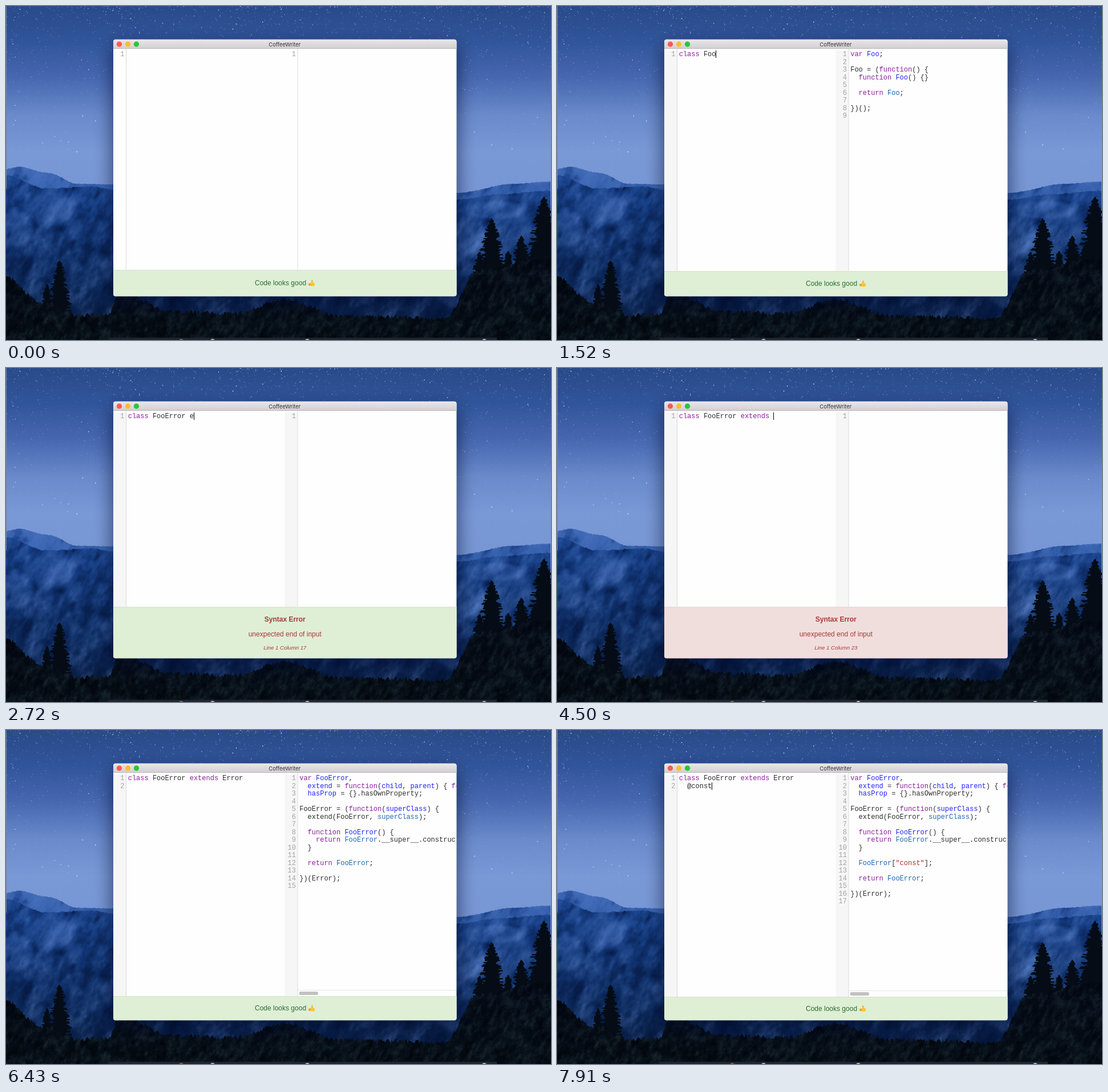
An HTML page with a canvas that plays this animation: 955x586 px, repeating every 8 s.

```html
<!DOCTYPE html>
<html lang="en">
<head>
<meta charset="utf-8">
<title>CoffeeWriter</title>
<style>
  html, body { margin: 0; width: 100%; height: 100%; overflow: hidden; }
  canvas { display: block; }
</style>
</head>
<body>
<canvas id="stage" width="955" height="586"></canvas>
<script>
const W = 955, H = 586, LOOP = 8000, KEY_MS = 150;
const stage = document.getElementById('stage');
const screen = stage.getContext('2d');
const backdrop = document.createElement('canvas');
backdrop.width = W;
backdrop.height = H;
let g = backdrop.getContext('2d');

const MONO = '12px "Liberation Mono", monospace';
const SANS = '"Liberation Sans", sans-serif';
const CHAR = 7.2, LINE = 13.5;
const win = { left: 188, top: 58.7, right: 789.5, bottom: 509.3 };
win.width = win.right - win.left;
win.middle = (win.left + win.right) / 2;

let seed = 7;
const rand = (a = 0, b = 1) => {
  seed = (seed * 16807) % 2147483647;
  return a + (b - a) * seed / 2147483647;
};

function rect(color, x, y, w, h) {
  g.fillStyle = color;
  g.fillRect(x, y, w, h);
}

function box(color, x, y, w, h, r) {
  g.fillStyle = color;
  g.beginPath();
  g.roundRect(x, y, w, h, r);
  g.fill();
}

const disc = (color, x, y, r) => box(color, x - r, y - r, 2 * r, 2 * r, r);

function text(str, x, y, font, color, align = 'left') {
  g.font = font;
  g.fillStyle = color;
  g.textAlign = align;
  g.fillText(str, x, y);
}

function vertical(y0, y1, ...colors) {
  const grad = g.createLinearGradient(0, y0, 0, y1);
  colors.forEach((c, i) => grad.addColorStop(i / (colors.length - 1), c));
  return grad;
}

// ---- Night landscape ----

const mix = (a, b, t) => a + (b - a) * t;
const smooth = t => t * t * (3 - 2 * t);

function hash(x, y) {
  const v = Math.sin(x * 127.1 + y * 311.7) * 43758.5453;
  return v - Math.floor(v);
}

function noise(x, y) {
  const i = Math.floor(x), j = Math.floor(y), u = smooth(x - i), v = smooth(y - j);
  return mix(mix(hash(i, j), hash(i + 1, j), u), mix(hash(i, j + 1), hash(i + 1, j + 1), u), v);
}

// Layered noise around zero, stretched along a slope
function fractal(x, y) {
  let sum = 0;
  for (let octave = 0, amp = 0.5; octave < 4; octave++, amp *= 0.65) {
    const f = 2 ** octave;
    sum += amp * (noise((x + y * 0.5) * f, (y - x * 0.3) * f * 0.6) - 0.5);
  }
  return sum;
}

// Skyline through key points, filled to the bottom, with a noisy surface
function ridge(color, rough, points, scale, light, dark, glow = () => 0) {
  g.beginPath();
  points.slice(1).forEach(([x1, y1], i) => {
    const [x0, y0] = points[i];
    for (let x = x0; x <= x1; x += 2) {
      g.lineTo(x, mix(y0, y1, smooth((x - x0) / (x1 - x0))) + rand(-rough, rough));
    }
  });
  g.lineTo(W, H);
  g.lineTo(0, H);
  g.fillStyle = color;
  g.fill();
  g.save();
  g.clip();
  for (let y = 280; y < H; y += 2) {
    for (let x = 0; x < W; x += 2) {
      const v = fractal(x / scale, y / scale) + glow(x, y);
      rect(v > 0 ? `rgba(${light},${v})` : `rgba(${dark},${-2 * v})`, x, y, 2, 2);
    }
  }
  g.restore();
}

function tree(x, top, base) {
  const half = (base - top) * 0.22;
  for (let y = top; y < base; y += 2) {
    const w = 1.5 + half * ((y - top) / (base - top)) ** 0.65;
    const left = w * rand(0.5, 1.1);
    rect('#050c16', x - left, y, left + w * rand(0.5, 1.1), 2.5);
  }
}

function drawBackdrop() {
  rect(vertical(0, 320, '#294a89', '#31559b', '#4868b1', '#6a8acb', '#7998d6', '#7896d4'), 0, 0, W, H);
  for (let i = 0; i < 2800; i++) {
    const y = 290 * rand() ** 1.7, size = rand(0.5, 1.3);
    rect(`rgba(205,222,255,${rand(0.1, 0.75) * (1 - y / 380)})`, rand(0, W), y, size, size);
  }
  for (let i = 0; i < 130; i++) disc('rgba(235,243,255,.8)', rand(0, W), 260 * rand() ** 1.5, rand(0.4, 0.9));

  ridge(vertical(282, 350, '#3f68b3', '#2f5aa6'), 0.6,
    [[0, 286], [22, 282], [75, 293], [125, 312], [188, 313], [790, 328], [890, 312], [955, 308]],
    25, '90,130,205', '10,45,115');

  const cliffs = [[80, 355, 45, 38], [12, 390, 38, 40], [855, 357, 62, 18], [815, 402, 30, 42]];
  const cliffGlow = (x, y) => cliffs.reduce((sum, [cx, cy, rx, ry]) =>
    sum + Math.min(0.3, Math.max(0, 1 - Math.hypot((x - cx) / rx, (y - cy) / ry))), 0);
  ridge(vertical(300, 560, '#1b458f', '#143a7d', '#10316b', '#0d2a5c', '#091c40'), 1,
    [[0, 297], [70, 320], [150, 317], [188, 322], [790, 340], [870, 330], [955, 324]],
    24, '100,140,215', '3,16,52', cliffGlow);

  const trees = [[94, 447], [72, 488], [851, 373], [830, 432], [903, 403], [880, 430], [943, 335], [925, 420]];
  for (const [x, top] of trees) tree(x, top, 545);
  ridge(vertical(440, 570, '#050c18', '#060e16'), 4,
    [[0, 474], [60, 520], [130, 543], [180, 540], [200, 502], [290, 536], [400, 540], [490, 514], [580, 543],
      [770, 548], [825, 465], [955, 440]],
    8, '45,65,75', '0,2,8');

  rect('#75839b', 0, 0, 1, 320);
  rect('#20252d', 180, 582, 680, 4);
  disc('#b5453f', 307, 588, 4);
  for (const x of [362, 528, 838]) disc('#b0b7bf', x, 588, 4);

  g.shadowColor = 'rgba(0,8,40,.65)';
  g.shadowBlur = 34;
  g.shadowOffsetY = 12;
  box('#fefefe', win.left, win.top, win.width, win.bottom - win.top, 4);
  g.shadowColor = 'transparent';
  box(vertical(58, 75, '#ebe8eb', '#d1cfd1'), win.left, win.top, win.width, 75 - win.top, [4, 4, 0, 0]);
  rect('#b8b5b8', win.left, 74, win.width, 1);
  ['#fc5a55', '#fdbd2e', '#2ac53f'].forEach((c, i) => disc(c, 198.5 + 15 * i, 67, 4.7));
  text('CoffeeWriter', 488.3, 70.5, '9.4px Inter, sans-serif', '#333', 'center');
}

// ---- Typing and compiling ----

// Each burst: time of its first key, then one key per KEY_MS
const bursts = [
  [150, 'class '],
  [1220, 'Foo'],
  [1820, 'Error'],
  [2720, [' e', 'x']],
  [3300, 'tend'],
  [4200, 's'],
  [4500, ' Erro'],
  [5540, ['r', '\n', '  ']],
  [6870, '@'],
  [7170, 'cons'],
  [7910, 't'],
];
const keys = bursts.flatMap(([start, chars]) =>
  [...chars].map((key, i) => ({ key, at: start + i * KEY_MS })));

// In the generated code ~ marks a definition and ^ a local variable
function compile(source) {
  const [head, body = ''] = source.split('\n').map(s => s.trim());
  if (!head) return '';
  if (!head.startsWith('class')) return head + ';\n';
  const [, name, rest, parent] = head.match(/^class ?(\w*)( e\w*)? ?(\w*)$/);
  if (rest && !parent) return null;
  if (!name) return '(function() {\n  function ~_Class() {}\n\n  return ^_Class;\n\n})();\n';
  if (!parent) {
    return `var ~${name};\n\n${name} = (function() {\n  function ~${name}() {}\n\n  return ^${name};\n\n})();\n`;
  }
  const member = body.slice(1);
  const access = member === 'const' ? '["const"]' : member && '.' + member;
  return `var ~${name},
  ~extend = function(~child, ~parent) { for (var ~key in ^parent) {
  ~hasProp = {}.hasOwnProperty;

${name} = (function(~superClass) {
  extend(${name}, ^superClass);

  function ~${name}() {
    return ^${name}.__super__.constructor.apply(this, arguments);
  }
${body && `\n  ^${name}${access};\n`}
  return ^${name};

})(${parent});
`;
}

// ---- Editor ----

function tokenColor(token) {
  if (/^(class|extends|var|function|return|for|in)$/.test(token)) return '#8a1f9c';
  return { '~': '#2222ff', '^': '#1a66b8', '"': '#b52a2a' }[token[0]] || '#2c2c2c';
}

function drawEditor(code, x, width, bottom, active) {
  if (active) rect('#f6f6f6', x, 78, 22, bottom - 78);
  rect('#d9d9d9', x + 22, 75, 1, bottom - 75);
  g.save();
  g.beginPath();
  g.rect(x, 75, width, bottom - 75);
  g.clip();
  code.split('\n').forEach((line, row) => {
    const y = Math.round(88 + LINE * row);
    text(row + 1, x + 19.5, y, MONO, '#a4a4a4', 'right');
    let col = 0;
    for (const token of line.match(/"[^"]*"|[~^]?\w+|[^\w"~^]+/g) || []) {
      const word = token.replace(/[~^]/, '');
      text(word, x + 25.7 + col * CHAR, y, MONO, tokenColor(token));
      col += word.length;
    }
  });
  g.restore();
}

function drawThumb(y) {
  box('#f7b731', 535, y - 6, 2.6, 8, 1.3);
  box('#fcc52f', 533, y - 1.5, 8, 6, 2);
  box('#eda42a', 530, y - 0.5, 4, 4.5, 1.5);
}

function drawStatus(top, column, failed) {
  box(failed ? '#f0dedd' : '#deefd6', win.left, top, win.width, win.bottom - top, [0, 0, 4, 4]);
  rect(failed ? '#e9d2d2' : '#d2e3ca', win.left, top, win.width, 1);
  if (column) {
    const line = (str, y, font) => text(str, win.middle, y, `${font} ${SANS}`, '#a83a38', 'center');
    line('Syntax Error', 445, 'bold 12px');
    line('unexpected end of input', 471, '12px');
    line(`Line 1 Column ${column}`, 494, 'italic 9.6px');
  } else {
    const middle = (top + win.bottom) / 2;
    text('Code looks good', 436, middle + 4.3, `12px ${SANS}`, '#2c6e2f');
    drawThumb(middle + 0.5);
  }
}

function drawScene(t) {
  g.drawImage(backdrop, 0, 0);
  const source = keys.filter(k => k.at <= t + 0.5).map(k => k.key).join('');
  const output = compile(source);
  const code = output || '';
  const failed = output === null;
  // Longer output squeezes the status bar slightly
  const top = failed ? 419 : Math.round(462.7 + 0.31 * code.split('\n').length);

  drawEditor(source, 188, 301, top, source);
  drawEditor(code, 488.5, 300.5, top, source);
  if (code.includes('~extend')) {
    rect('#fefefe', 512, top - 11, 277, 11);
    rect('#e4e4e4', 512, top - 11, 277, 1);
    box('#c1c1c1', 513.5, top - 8, 33.5, 6, 3);
  }
  drawStatus(top, failed && source.trimEnd().length + 1, t >= 2870 && t < 4800);

  const blinkOff = t >= 6430 && t < 6870;
  if (source && !blinkOff) {
    const lines = source.split('\n'), row = lines.length - 1;
    rect('#000', Math.floor(214 + lines[row].length * CHAR), Math.round(78 + LINE * row), 1, 13);
  }
}

drawBackdrop();
g = screen;
function tick() {
  drawScene(performance.now() % LOOP);
  requestAnimationFrame(tick);
}
tick();
</script>
</body>
</html>
```
